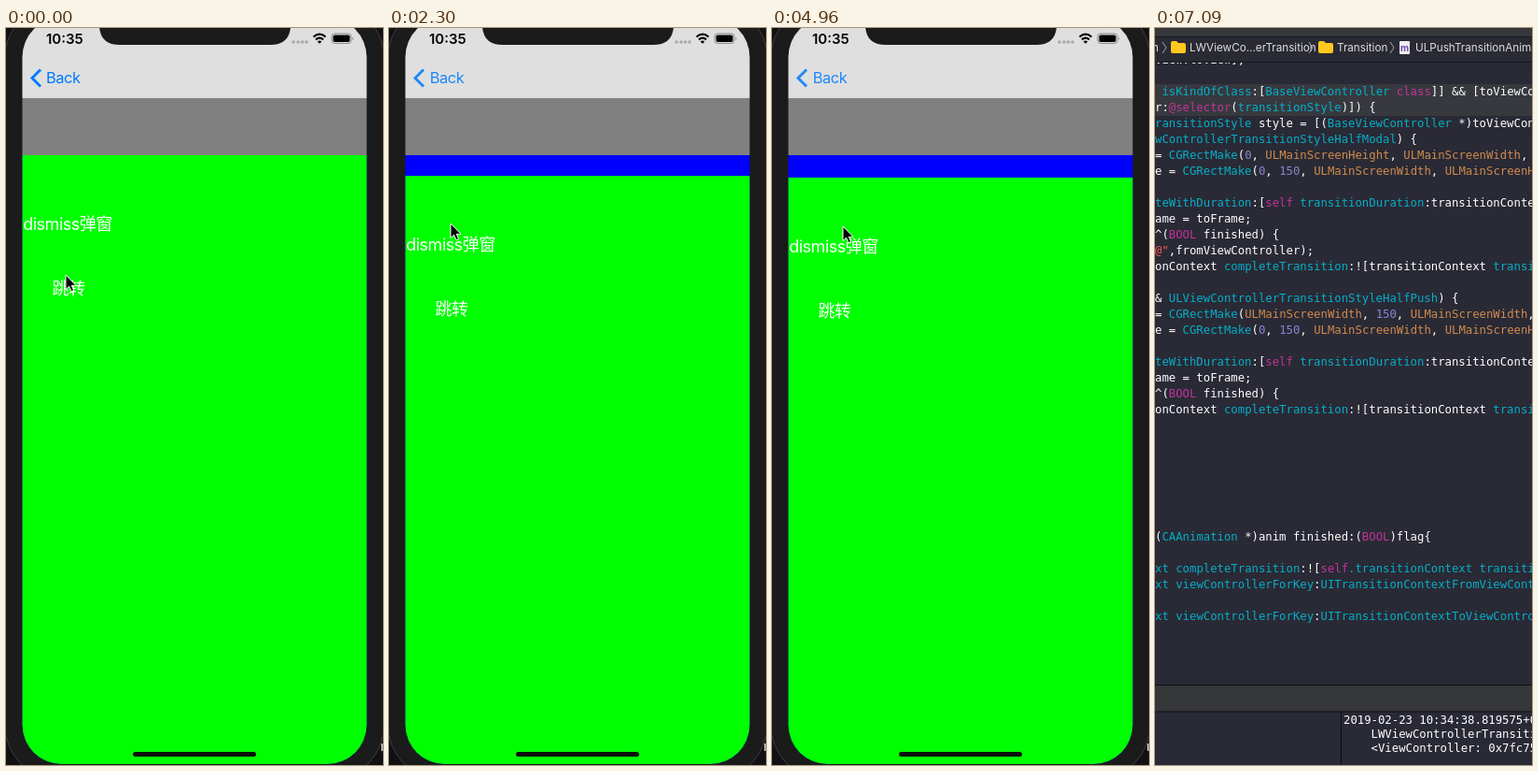
Write an HTML page that moves like this. It is 404 px wide and 788 px high and loops after 7490 ms.

```html
<!DOCTYPE html>
<html lang="zh-CN">
<head>
<meta charset="utf-8">
<style>
html, body { margin: 0; width: 100%; height: 100%; overflow: hidden; background: #111; }
svg { display: block; }
text { white-space: pre; }
.ui { font-family: Inter, "Noto Sans CJK SC", "Noto Sans CJK", sans-serif; }
.label { font-size: 18px; letter-spacing: -.5px; text-anchor: middle; fill: #fff; }
.code { font: 12.29px "DejaVu Sans Mono", monospace; fill: #fff; }
.path { font-size: 11.7px; fill: #dedee0; }
</style>
</head>
<body>
<svg width="404" height="788" viewBox="0 0 404 788">
  <defs>
    <clipPath id="screen"><rect x="17.5" y="-11" width="369" height="798" rx="42"/></clipPath>
    <path id="folder" d="M0 2q0-2 2-2h4l2 2h6q2 0 2 2v7q0 2-2 2H2q-2 0-2-2z" fill="#ffc81e"/>
    <path id="crumb" d="M0 0l4 6-4 6" fill="none" stroke="#aaa"/>
  </defs>

  <g id="phone" class="ui">
    <rect width="404" height="788" fill="#111114"/>
    <path d="M402 765h2v8h-2z" fill="#aaa"/>
    <rect x="-1.5" y="-28" width="407" height="833" rx="61" fill="#1b1b1b" stroke="#3c3c3c"/>
    <g clip-path="url(#screen)">
      <rect x="17" width="370" height="75" fill="#dfdfdf"/>
      <rect x="17" y="75" width="370" height="61" fill="#808080"/>
      <rect x="17" y="136" width="370" height="652" fill="#00f"/>
      <text class="label" x="66.5" y="177">拉起弹窗</text>
      <g id="sheet">
        <rect x="17" y="136" width="370" height="652" fill="#0f0"/>
        <text class="label" x="66" y="216">dismiss弹窗</text>
        <text class="label" x="67" y="285">跳转</text>
      </g>
      <g id="pushed">
        <rect x="17" y="136" width="370" height="652" fill="#ff0"/>
        <text class="label" x="66" y="216" style="fill:red">pop弹窗</text>
      </g>
      <g id="back">
        <path d="M37 44.5l-9 9 9 9" fill="none" stroke="#007aff" stroke-width="2.9"/>
        <text id="backLabel" x="43" y="59" font-size="16.5" letter-spacing="-.5" fill="#007aff">Back</text>
      </g>
      <text x="43" y="16.500" font-size="15" font-weight="600">10:35</text>
      <g fill="#aaa">
        <circle cx="308" cy="15" r="1.800"/><circle cx="313" cy="15" r="1.800"/>
        <circle cx="317.500" cy="15" r="1.800"/><circle cx="322" cy="15" r="1.800"/>
      </g>
      <g fill="none" stroke="#000" stroke-width="2.200">
        <path d="M329.500 9.500q6.500-5.600 13 0M332 12.300q4-3.400 8 0"/>
        <path d="M336 16.800l-2.300-2.400q2.300-1.800 4.600 0z" fill="#000" stroke="none"/>
      </g>
      <rect x="349" y="6" width="21" height="10.500" rx="3" fill="none" stroke="#8a8a8a"/>
      <rect x="350.500" y="7.500" width="18" height="7.500" rx="1.700"/>
      <path d="M371.500 9.500q2 1.800 0 3.600z" fill="#8a8a8a"/>
      <rect id="home" x="136" y="774" width="132" height="5" rx="2.500"/>
    </g>
    <path d="M100-2Q101 18 122 18H283Q304 18 305-2z" fill="#1b1b1b"/>
    <path id="cursor" d="M0 0V15.500L3.600 12.200 6 17.600 8.600 16.500 6.300 11.300H11z" stroke="#fff"/>
  </g>

  <g id="editor">
    <rect width="404" height="788" fill="#292a35"/>
    <rect y="60" width="404" height="34" fill="#37393f"/>
    <g id="lines"></g>
    <rect width="404" height="36" fill="#292a33"/>
    <rect width="404" height="9" fill="#37383c"/>
    <path d="M0 9.500H404M0 36.500H404" stroke="#17181c"/>
    <g class="ui path">
      <text x="-3" y="25">n</text>
      <use href="#crumb" x="8" y="15"/>
      <use href="#folder" x="17" y="14"/>
      <text x="37" y="25">LWViewCo…erTransition</text>
      <use href="#crumb" x="165" y="15"/>
      <use href="#folder" x="175" y="14"/>
      <text x="195" y="25">Transition</text>
      <use href="#crumb" x="252" y="15"/>
      <rect x="262" y="14" width="11" height="14" rx="1" fill="#eee"/>
      <text x="263" y="25" style="font-size:10px;font-weight:700;fill:#6d4bb5">m</text>
      <text x="279" y="25">ULPushTransitionAnimator.m</text>
    </g>
    <rect y="702" width="404" height="29" fill="#353638"/>
    <path d="M0 702.500H404M0 731H404M199.500 731V788" stroke="#0e0f12"/>
    <g class="code" font-weight="700" id="log"></g>
  </g>
</svg>
<script>
const $ = id => document.getElementById(id);
const LOOP = 7490, STEP = 177.25, LAST = 40, SLIDE = 500;

// Code listing: line pitch 17, blank rows kept
const listing = `View:toView];

 isKindOfClass:[BaseViewController class]] && [toViewCon
r:@selector(transitionStyle)]) {
ransitionStyle style = [(BaseViewController *)toViewCon
wControllerTransitionStyleHalfModal) {
= CGRectMake(0, ULMainScreenHeight, ULMainScreenWidth,
e = CGRectMake(0, 150, ULMainScreenWidth, ULMainScreenHeight

teWithDuration:[self transitionDuration:transitionContext
ame = toFrame;
^(BOOL finished) {
@",fromViewController);
onContext completeTransition:![transitionContext transitionWas

& ULViewControllerTransitionStyleHalfPush) {
= CGRectMake(ULMainScreenWidth, 150, ULMainScreenWidth,
e = CGRectMake(0, 150, ULMainScreenWidth, ULMainScreenHeight

teWithDuration:[self transitionDuration:transitionContext
ame = toFrame;
^(BOOL finished) {
onContext completeTransition:![transitionContext transitionWas







(CAAnimation *)anim finished:(BOOL)flag{

xt completeTransition:![self.transitionContext transitionWas
xt viewControllerForKey:UITransitionContextFromViewController

xt viewControllerForKey:UITransitionContextToViewController`;

const syntax = [
  ["#c2349b", /^(self|class|BOOL|@selector)$/],
  ["#d08a4e", /^ULMain/],
  ["#8b84cf", /^\d+$/],
  ["#fc5a5c", /^@"$/],
  ["#06aec9", /^(isKindOfClass|BaseView\w+|t?ransitionStyle|\w+TransitionStyle\w+|CGRectMake|teWith\w+|transitionDuration|completeTransition|transitionWas|CAAnimation|xt|viewControllerForKey|UITransition\w+|\.transitionContext)$/]
];
const escapeText = s => s.replace(/&/g, "&amp;").replace(/</g, "&lt;");
const paint = line => line.replace(/@"|@?\.?\w+|[^\w@.]+/g, token => {
  const rule = syntax.find(([, test]) => test.test(token));
  return rule ? `<tspan fill="${rule[0]}">${token}</tspan>` : escapeText(token);
});
$("lines").innerHTML = listing.split("\n").map((line, i) =>
  `<text class="code" x="0" y="${38 + 17 * i}">${paint(line)}</text>`).join("");
$("log").innerHTML = ["2019-02-23 10:34:38.819575+0800", "    LWViewControllerTransition", "    <ViewController: 0x7fc75"]
  .map((line, i) => `<text x="202" y="${744 + 15 * i}">${escapeText(line)}</text>`).join("");

// Cursor path: time, x, y
const track = [
  [0, 64, 264], [500, 64, 264], [1240, 72, 204], [1500, 72, 204], [2120, 66, 209], [2400, 66, 209],
  [3019, 67, 185], [3190, 67, 173], [3740, 67, 173], [4700, 76, 212], [5320, 76, 212],
  [5490, 90, 141], [5850, 171, 660], [6050, 171, 660], [6380, 321, 760], [6560, 325, 790], [LOOP, 325, 790]
];
function cursorAt(t) {
  const k = track.findIndex(p => p[0] > t);
  const [t0, x0, y0] = track[k - 1], [t1, x1, y1] = track[k];
  const f = (t - t0) / (t1 - t0);
  return [x0 + (x1 - x0) * f, y0 + (y1 - y0) * f];
}

const ramp = (t, start) => Math.min(1, Math.max(0, (t - start) / SLIDE));
const ease = p => p * p * (3 - 2 * p);
const move = (id, x, y) => $(id).setAttribute("transform", `translate(${x} ${y})`);

function draw(now) {
  const t = Math.min(LAST, Math.floor((now % LOOP + 7) / STEP)) * STEP;
  const inEditor = t > 6900;
  $("phone").style.display = inEditor ? "none" : "";
  $("editor").style.display = inEditor ? "" : "none";

  const push = ramp(t, 350), pop = ramp(t, 1500);
  const drop = ramp(t, 2249), rise = ramp(t, 3150), dropAgain = ramp(t, 4905.5);
  const gone = drop - rise + dropAgain;
  const sunk = ease(drop) - ease(rise) + ease(dropAgain);

  move("pushed", 370 * (1 - ease(push) + ease(pop)), 0);
  move("sheet", 0, 652 * sunk);
  move("backLabel", 20 * sunk, 0);
  $("back").setAttribute("opacity", Math.max(0, 1 - 1.25 * gone) * Math.abs(1 - 2 * push) * Math.abs(1 - 2 * pop));
  $("home").setAttribute("fill", gone === 1 ? "#48484c" : "#0a100a");
  move("cursor", ...cursorAt(t));
}

const start = performance.now();
function tick() {
  draw(performance.now() - start);
  requestAnimationFrame(tick);
}
tick();
</script>
</body>
</html>
```
